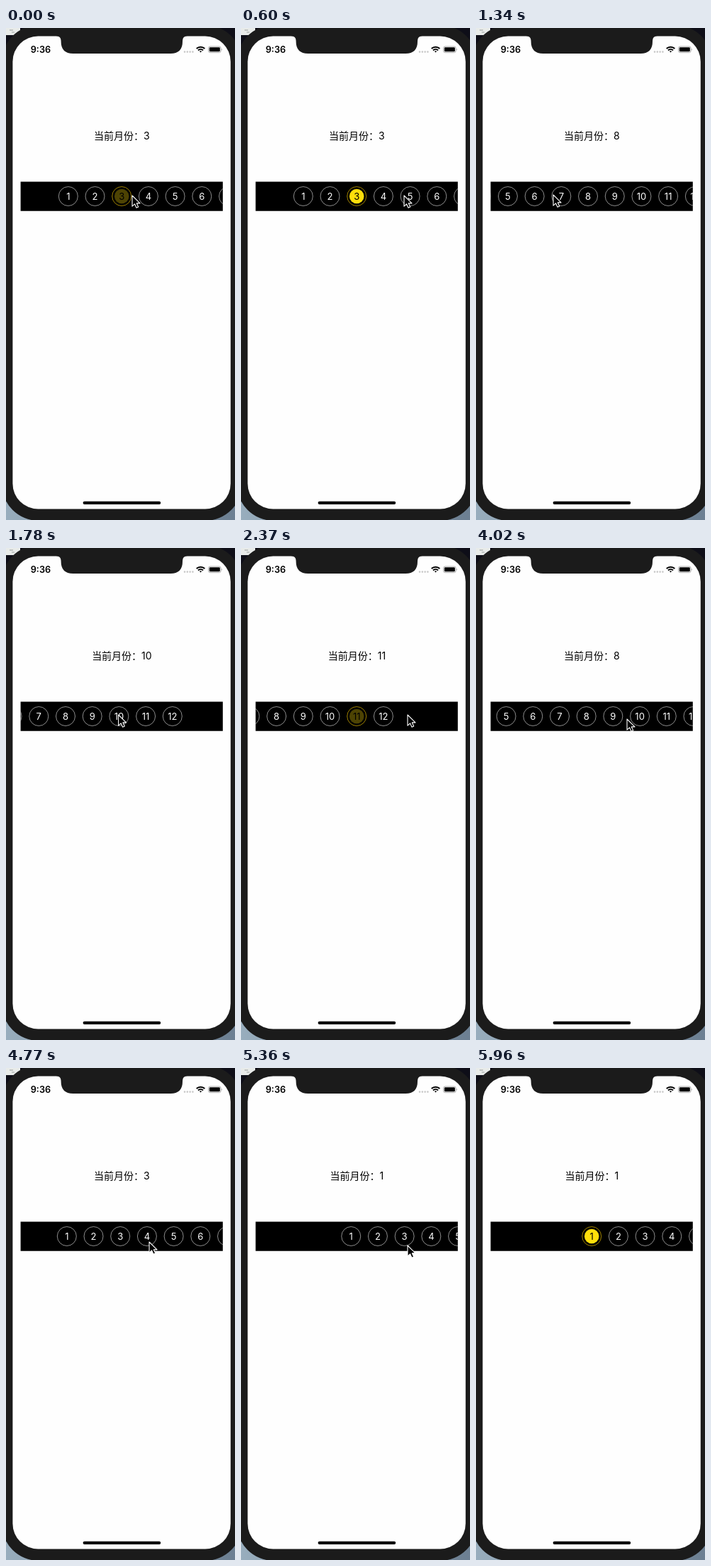
An HTML page that plays this animation: 323 by 693 pixels, repeating every 6260 ms.

```html
<!DOCTYPE html>
<html lang="zh-CN">
<head>
<meta charset="utf-8">
<style>
  html, body { margin: 0; width: 100%; height: 100%; overflow: hidden; background: #0e0e18; }
  svg { display: block; width: 100vw; height: 100vh; }
  text { font-family: Inter, 'Noto Sans CJK SC', 'Noto Sans CJK', sans-serif; text-anchor: middle; }
  .month circle { fill: none; stroke: #fff; stroke-width: .55; }
  .month text { font-size: 13px; fill: #fff; }
  .month .disc { fill: #ffdf0b; stroke: none; opacity: 0; }
  .month.on .ring { stroke: #e2b800; stroke-width: .7; }
  .month.on text { fill: #000; }
</style>
</head>
<body>
<svg viewBox="0 0 323 693">
  <defs>
    <linearGradient id="desk">
      <stop offset="0" stop-color="#98adbd"/><stop offset="1" stop-color="#6c7f92"/>
    </linearGradient>
    <clipPath id="clip"><rect x="20.6" y="216.5" width="285.2" height="41.2"/></clipPath>
  </defs>

  <!-- desktop and phone -->
  <rect y="640" width="323" height="53" fill="url(#desk)"/>
  <path d="M0 0h20v10H0z" fill="#e8ebe9"/>
  <path d="M5 3h5M8 6h4" stroke="#9a9f9d"/>
  <rect x="-6" y="-4" width="339" height="698" rx="52" fill="#1b1b1b"/>
  <rect x="9.4" y="11.4" width="307.4" height="666.2" rx="36" fill="#fefefe"/>
  <path d="M70.5 11Q77.6 11.5 77.6 18V19q0 17 17 17H232q17 0 17-17V18Q249 11.5 256 11z" fill="#1b1b1b"/>
  <rect x="108.6" y="666.8" width="109.6" height="4.1" rx="2"/>

  <!-- status bar -->
  <text x="48.9" y="34.8" font-size="12.7" font-weight="600">9:36</text>
  <path d="M252 33.6h12" stroke="#c9c9c9" stroke-width="2.6" stroke-linecap="round" stroke-dasharray="0 3.8"/>
  <g fill="none" stroke="#000" stroke-width="2">
    <path d="M268.7 29a8.3 8.3 0 0 1 11.6 0M271 31.5a5 5 0 0 1 7 0"/>
    <path d="M272.8 32.8L274.5 34.6L276.2 32.8Q274.5 31.6 272.8 32.8z" fill="#000" stroke="none"/>
  </g>
  <rect x="285.5" y="26" width="17.6" height="8.6" rx="2.4" fill="none" stroke="#999" stroke-width=".8"/>
  <rect x="286.8" y="27.3" width="15" height="6" rx="1.3"/>
  <path d="M304.2 28.8q1.4 1.5 0 3z" fill="#888"/>

  <text id="label" x="163.4" y="157" font-size="14"></text>
  <g clip-path="url(#clip)"><rect width="323" height="300"/><g id="strip"></g></g>
  <path id="cursor" d="M0 0V15.2L3.6 11.9L6 17.2L8.7 16L6.3 10.9H11z" stroke="#fff" stroke-width="1.1" stroke-linejoin="round"/>
</svg>
<script>
const STEP = 149, LOOP = 6260, LAST = 40, PITCH = 37.7, CENTER = 163.2;
const $ = id => document.getElementById(id);

// Times are counted in steps of the stepped playback.
const swipes = [
  { start: 4.5, end: 16, from: 3, to: 11 },
  { start: 17.5, end: 21, from: 11, to: 12 },
  { start: 24.5, end: 38, from: 12, to: 1 },
];
const stops = [ // pointer tip: step, x, y
  [0, 178, 236], [4, 230, 236], [9, 109, 235], [16, 235, 235], [21, 153, 235],
  [27, 213, 241], [32, 202, 245], [36, 235, 250], [38.5, 304, 659],
];

const clamp = u => Math.max(0, Math.min(1, u));
const decelerate = u => 1 - (1 - u) ** 2.07;
const smooth = u => u * u * (3 - 2 * u);

function scrollAt(s) {
  const { start, end, from, to } = swipes.findLast(w => s >= w.start) || swipes[0];
  return from + (to - from) * decelerate(clamp((s - start) / (end - start)));
}

// Fade of the selected disc: 0 while scrolling, growing once at rest.
function highlightAt(s) {
  if (swipes.some(w => s > w.start && s < w.end)) return 0;
  const settled = Math.max(0, ...swipes.map(w => w.end).filter(e => e <= s));
  return Math.min(1, .3 + .35 * (s - settled));
}

function pointerAt(s) {
  const i = Math.min(stops.findLastIndex(p => s >= p[0]), stops.length - 2);
  const [a, b] = stops.slice(i);
  const u = smooth(clamp((s - a[0]) / (b[0] - a[0])));
  return [1, 2].map(k => a[k] + (b[k] - a[k]) * u);
}

$('strip').innerHTML = Array.from({ length: 12 }, (_, i) =>
  `<g class="month" transform="translate(${(i + 1) * PITCH} 237)">
    <circle class="ring" r="13.5"/><circle class="disc" r="10.3"/><text y="4.7">${i + 1}</text></g>`).join('');
const months = [...$('strip').children];

function draw(time) {
  const s = Math.min(LAST, Math.floor((time % LOOP + 15) / STEP));
  const pos = scrollAt(s), current = Math.round(pos), highlight = highlightAt(s);
  $('strip').setAttribute('transform', `translate(${CENTER - pos * PITCH} 0)`);
  $('label').textContent = '当前月份：' + current;
  months.forEach((month, i) => {
    const on = highlight > 0 && i + 1 === current;
    month.classList.toggle('on', on);
    month.children[1].style.opacity = on ? highlight : 0;
  });
  $('cursor').setAttribute('transform', `translate(${pointerAt(s)})`);
  $('cursor').style.display = s === LAST ? 'none' : '';
}

const begin = performance.now();
(function tick() {
  draw(performance.now() - begin);
  requestAnimationFrame(tick);
})();
</script>
</body>
</html>
```
